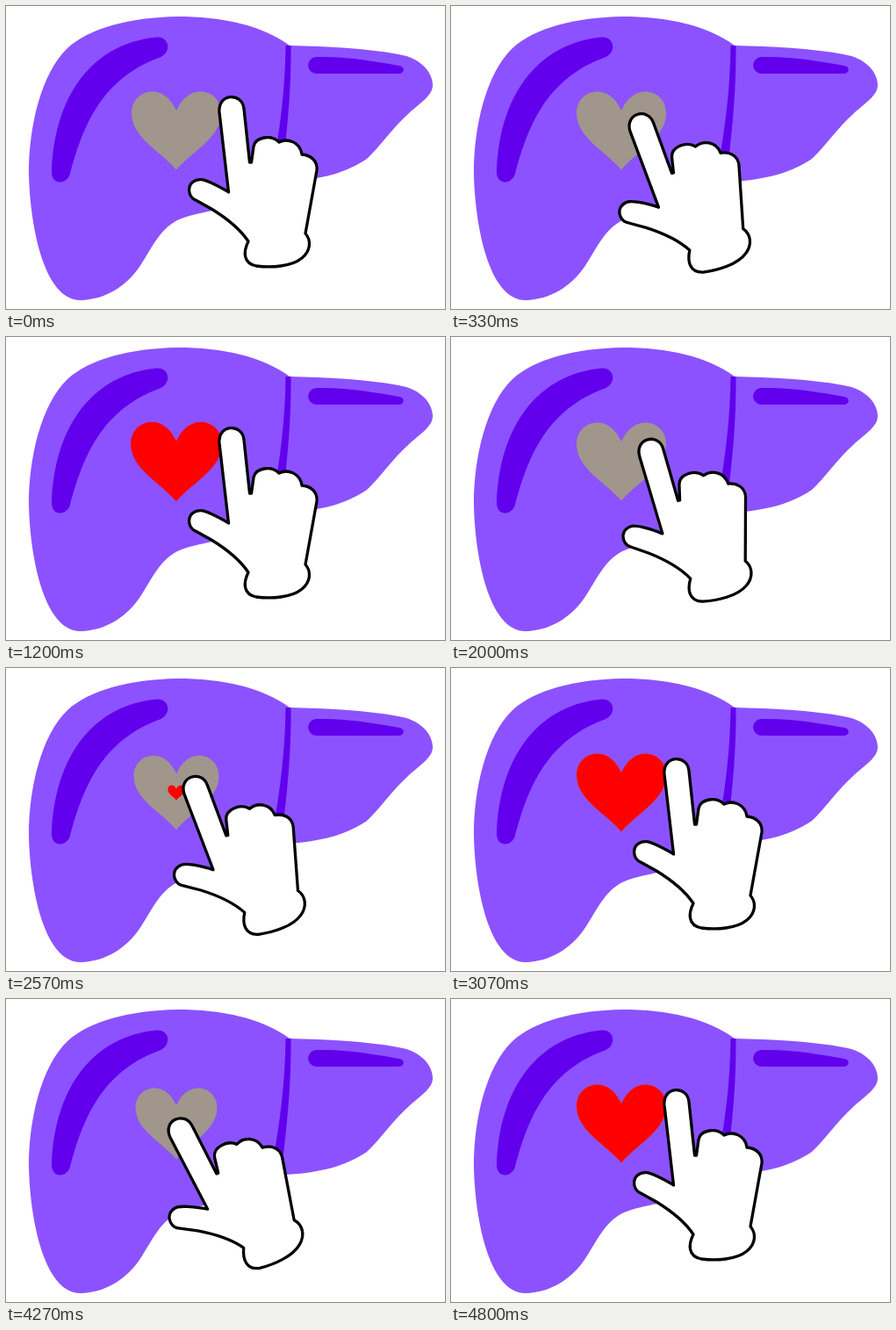
Recreate the animation shown at these times as an HTML page with a canvas. Size 500 px wide and 345 px high, loop 5.26 s.

```html
<!DOCTYPE html>
<html lang="en">
<head>
<meta charset="utf-8">
<title>Tap the heart</title>
<style>
  html, body { margin: 0; width: 100%; height: 100%; overflow: hidden; background: #fff; }
  canvas { display: block; width: 500px; height: 345px; }
</style>
</head>
<body>
<canvas id="stage" width="500" height="345"></canvas>
<script>
const ctx = document.getElementById('stage').getContext('2d');

const LOOP = 5260;
const TICK = 100 / 3;         // display clock, ms
const TICKS_PER_STEP = 2.4;   // one animation step is 80 ms
const STEPS_PER_TAP = 22;

const PURPLE = '#8c52ff', DARK = '#6200ee', GREY = '#a0968c', RED = '#ff0000';
const PIVOT = { x: 315, y: 290 };
const HEART = { x: 194, y: 142 };

const liver = new Path2D(`M323 45 C292 22 247 12 195 12 C141 13 95 25 70 48
  C40 77 26 137 26 190 C27 246 42 335 85 335 C113 334 136 320 152 297
  C165 278 174 255 195 244 C208 238 221 236 235 233 C266 225 288 202 318 200
  C360 198 389 189 411 174 C426 160 440 139 458 123 C472 110 486 102 486 90
  C486 76 473 59 447 55 C410 48 365 46 323 45Z`);

const fissure = new Path2D(`M318.5 45 L324.5 45 C325 92 321 135 315 185
  L304 185 C312 140 318 95 318.5 45Z`);

const leftShine = new Path2D(`M172 35.5 C100 42 55 100 52 189
  C52 204 69 204 73 191 C85 148 103 85 174 59
  C189 54 187 35 172 35.5Z`);

const rightShine = new Path2D(`M354 58 C388 57 420 63 448 68
  C455 69 454 77 447 77 L354 77 C341 76 341 59 354 58Z`);

const heart = new Path2D(`M0 -23 C-7 -38 -17 -44.5 -27 -44.5
  C-41 -44.5 -51 -34 -51 -20 C-51 8 -18 23 0 44.5
  C18 23 51 8 51 -20 C51 -34 41 -44.5 27 -44.5 C17 -44.5 7 -38 0 -23Z`);

const hand = new Path2D(`M253.5 212 L243 121 C241 99 269 98 271 117 L277.5 178 L279.5 178
  L282 160 C284 149 302 146 311 155 C321 150 335 155 337 169
  C347 170 355 176 354 187 L341 259 C348 267 347 279 337 287
  C325 297 302 298 285 296 C270 293 270 280 276 268
  C266 253 247 239 234 231 L216 221 C207 217 207 206 212 201
  C219 195 226 198 233 201 Q246 207 253.5 212Z`);

// Keys are [step, value] pairs within one tap.
const handAngle = [[0.5, 0], [5.75, 21], [6, 21], [8, 17.7], [9, 21], [10, 14.4], [13, 0]];
const pressScale = [[4, 1], [6, 0.91], [8, 0.95], [9, 0.91], [10, 0.95], [11, 1]];
const redScale = [[9, 0], [10, 0.19], [12, 0.85], [13, 1.05], [16, 1]];

function valueAt(keys, step) {
  if (step <= keys[0][0]) return keys[0][1];
  for (let i = 1; i < keys.length; i++) {
    const [s0, v0] = keys[i - 1], [s1, v1] = keys[i];
    if (step <= s1) return v0 + (v1 - v0) * (step - s0) / (s1 - s0);
  }
  return keys[keys.length - 1][1];
}

function fill(path, color) {
  ctx.fillStyle = color;
  ctx.fill(path);
}

function drawHeart(scale, color) {
  if (scale <= 0) return;
  ctx.save();
  ctx.translate(HEART.x, HEART.y);
  ctx.scale(scale, scale);
  fill(heart, color);
  ctx.restore();
}

function drawHand(degrees) {
  ctx.save();
  ctx.translate(PIVOT.x, PIVOT.y);
  ctx.rotate(-degrees * Math.PI / 180);
  ctx.translate(-PIVOT.x, -PIVOT.y);
  fill(hand, '#fff');
  ctx.lineWidth = 3.3;
  ctx.lineJoin = 'round';
  ctx.strokeStyle = '#000';
  ctx.stroke(hand);
  ctx.restore();
}

function draw(time) {
  const tick = Math.floor((time % LOOP + 4) / TICK);
  const step = Math.floor(tick / TICKS_PER_STEP + 1e-6) % STEPS_PER_TAP;

  ctx.fillStyle = '#fff';
  ctx.fillRect(0, 0, 500, 345);
  fill(liver, PURPLE);
  fill(fissure, DARK);
  fill(leftShine, DARK);
  fill(rightShine, DARK);
  drawHeart(valueAt(pressScale, step), GREY);
  drawHeart(valueAt(redScale, step), RED);
  drawHand(valueAt(handAngle, step));
}

const start = performance.now();
function frame() {
  draw(performance.now() - start);
  requestAnimationFrame(frame);
}
frame();
</script>
</body>
</html>
```
